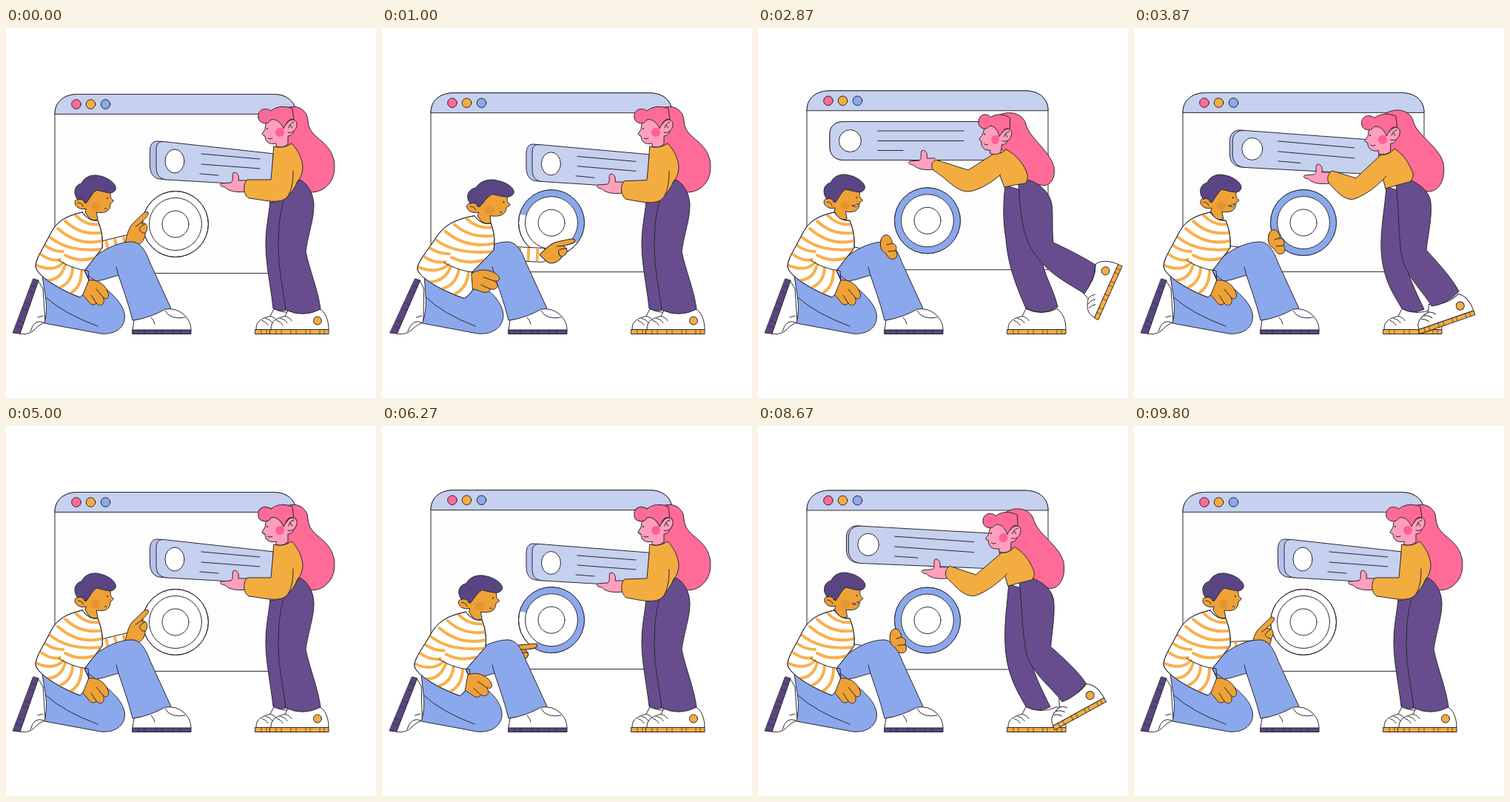
Write an HTML page that moves like this. It is 500x500 px and loops after 9.87 s.

```html
<!DOCTYPE html>
<html lang="en">
<head>
<meta charset="utf-8">
<title>Building a web page</title>
<style>
html, body { margin: 0; width: 100%; height: 100%; overflow: hidden; background: #fff; }
svg { display: block; width: 100vw; height: 100vh; }
svg * { vector-effect: non-scaling-stroke; }
.art { fill: none; stroke: #2b282e; stroke-width: 1; stroke-linejoin: round; stroke-linecap: round; }
.white { fill: #fff; } .paper { fill: #fdfdfd; }
.sky { fill: #c6d0ef; } .edge { fill: #b4c1ea; } .blue { fill: #8ba8ec; }
.plum { fill: #674d8d; } .ink { fill: #594583; }
.gold { fill: #f5ad40; } .shirt { fill: #f3ac40; } .tan { fill: #eea137; }
.rose { fill: #ff6b97; } .pink { fill: #ff9fbd; }
.stripe { stroke: #f8b04c; stroke-width: 4; }
.dark { fill: #262329; stroke: none; }
</style>
</head>
<body>
<svg viewBox="0 0 500 500">
<defs>
  <path id="knitShape" d="M103 249C80 254 68 262 60 278C50 298 40 312 40 322C41 335 75 355 100 364Q110 356 112 341L106 328L130 297C131 282 128 270 124 260Q112 262 103 249Z"/>
  <clipPath id="knit"><use href="#knitShape"/></clipPath>
  <g id="shoe">
    <path class="white" d="M1 -6C0 -18 11 -22 20 -24L25 -34Q46 -24 67 -34C75 -29 79 -19 79 -6Z"/>
    <path d="M20 -24Q26 -23 29 -18M14 -21Q20 -20 23 -15M9 -18Q14 -17 17 -12"/>
    <path class="gold" d="M0 -6H79V0H0Z"/>
    <path d="M8 -6V0M15 -6V0M28 -6V0M35 -6V0M48 -6V0M54 -6V0M67 -6V0M73 -6V0" stroke-width=".7"/>
  </g>
</defs>
<g class="art">
  <g id="page">
    <path class="paper" d="M66 331V116C66 100 78 89.500 97 89.500H361C380 89.500 392 100 392 116V331Z"/>
    <path class="sky" d="M66 116C66 100 78 89.500 97 89.500H361C380 89.500 392 100 392 116Z"/>
    <circle class="rose" cx="95" cy="103" r="6.300"/>
    <circle class="gold" cx="114.500" cy="103" r="6.300"/>
    <circle class="blue" cx="134.500" cy="103" r="6.300"/>
    <circle class="white" cx="229" cy="265" r="44.500"/>
    <circle id="dial" cx="229" cy="265" r="40" pathLength="360" transform="rotate(196 229 265)" stroke="#8ba8ec" stroke-width="9" stroke-linecap="butt"/>
    <circle cx="229" cy="265" r="44.500"/>
    <circle class="white" cx="229" cy="265" r="35.500"/>
    <circle cx="229" cy="265" r="18"/>
  </g>

  <g id="card">
    <path id="cardEdge" class="edge"/>
    <path id="cardFace" class="sky"/>
    <circle id="cardDot" class="white" r="1"/>
    <path id="cardText"/>
  </g>

  <g id="woman">
    <path id="hair" class="rose"/>
    <use href="#shoe" transform="translate(337 413.500)"/>
    <path id="farLeg" class="plum"/>
    <g id="nearShoe">
      <use href="#shoe"/>
      <circle class="gold" cx="64" cy="-18" r="5.500"/>
    </g>
    <path id="nearLeg" class="plum"/>
    <path id="torso" class="shirt"/>
    <path id="palm" class="pink" d="M325 206L314 206C316 199 311 193 307 196C305 200 308 206 304 209L291 210C287 212 292 215 296 215C300 220 310 223 325 221"/>
    <path id="arm" class="shirt"/>
    <g id="face">
      <path class="pink" d="M352 122L350 137L346 143Q347 146 350 146C350 155 358 158 365 156L365 160Q374 163 381 157L381 146C391 146 392 129 384 126L370 115Z"/>
      <circle cx="370" cy="141" r="6" fill="#ff5f90" stroke="none"/>
      <path class="rose" d="M341 121C339 111 350 106 358 112C366 105 378 105 387 109L389 124C380 121 378 132 375 136C372 127 364 122 358 124C354 132 341 129 341 121Z"/>
      <path class="pink" d="M379 130C383 122 393 122 393 130C393 138 387 143 381 141"/>
      <path d="M382 135Q383 129 389 127M384 131L387 135M354 149Q357 151 360 149"/>
      <circle class="dark" cx="353" cy="136" r="1"/>
    </g>
  </g>

  <g id="man">
    <path id="sleeveLine" stroke-width="20"/>
    <path id="sleeve" stroke="#fff" stroke-width="18"/>
    <path id="sleeveBands" stroke="#f8b04c" stroke-width="18" stroke-dasharray="4 8" stroke-linecap="butt"/>
    <g id="point">
      <path class="tan" d="M0 0C-3 -4 -8 3 -16 10L-22 16C-28 24 -29 33 -31 41L-17 44C-10 44 -4 36 -4 28C0 22 -1 17 -4 15L-10 14C-5 9 2 3 0 0Z"/>
      <path d="M-10 14L-17 19M-4 15Q-9 17 -12 22M-4 28Q-10 28 -12 23"/>
    </g>
    <path class="blue" d="M105 330C115 305 150 288 172 289C184 291 190 305 195 318L223 379Q198 393 171 395C165 370 157 350 152 334L132 340L105 346Z"/>
    <path d="M152 334L149 323"/>
    <path class="white" d="M171 408L173 395Q196 391 215 380Q230 378 240 387C248 394 250 402 250 408Z"/>
    <path d="M215 382Q222 395 242 391M196 391Q200 395 201 400"/>
    <path class="ink" d="M171 408H250V413.500H171Z"/>
    <path d="M179 408V413M187 408V413M203 408V413M211 408V413M226 408V413M236 408V413" stroke-width=".7"/>
    <g id="rest">
      <path class="tan" d="M166 287C167 280 174 277 178 282C180 285 182 288 181 291C187 292 188 297 186 301C190 305 187 313 183 312C179 314 175 309 173 305C167 302 164 296 166 287Z"/>
      <path d="M181 291L174 293M186 301L176 302"/>
    </g>

    <g id="sit">
      <path class="white" d="M43 341L50 352L53 398C46 400 41 405 37 409C31 414 24 414 18 413Z"/>
      <path d="M51 398Q38 392 33 410M50 389L43 391"/>
      <path class="ink" d="M37 339L44 341L19 413L9.500 412Z"/>
      <path d="M34 348L41 350M31 356L38 358M25 371L33 374M22 379L30 381M16 395L24 398M13 402L21 405" stroke-width=".7"/>
      <path class="blue" d="M49 334C52 360 58 375 52 399L128 413C150 415 163 402 160 386C156 366 132 350 112 335Z"/>
      <path d="M54 364Q78 386 124 403"/>
    </g>
    <g id="lean">
      <use href="#knitShape" class="white"/>
      <g class="stripe" clip-path="url(#knit)">
        <path d="M94 253Q108 268 128 265M80 261Q102 282 132 276M70 271Q98 296 132 287M60 283Q84 303 128 299M80 307Q98 317 118 311M53 294Q64 302 77 302M46 305Q60 316 73 313M40 320Q64 331 77 317M53 341Q74 342 80 320M69 352Q89 346 90 324M84 360Q102 352 102 328"/>
      </g>
      <use href="#knitShape"/>
      <path d="M71 314Q90 326 111 328L112 341"/>
      <g id="hand">
        <path class="tan" d="M112 341C122 339 134 346 138 358C140 366 135 368 131 364C135 373 128 378 122 372C118 376 114 374 110 368L104 361Z"/>
        <path d="M122 372L115 361M131 364L122 353"/>
      </g>
      <g id="head">
        <path class="tan" d="M110 215L142 217C140 228 141 231 145 233C145 236 142 236 141 237C141 247 135 251 122 249L124 259Q114 263 107 249L108 244C98 247 90 238 94 233C98 229 104 231 106 236Z"/>
        <circle cx="121" cy="241" r="6" fill="#e4952f" stroke="none"/>
        <path class="ink" d="M97 232C90 224 92 212 102 210C106 200 118 197 127 200C138 202 150 211 148 218C144 226 136 222 122 219C116 223 113 231 108 237C105 231 101 230 97 232Z"/>
        <path d="M97 236Q103 236 104 241"/>
        <circle class="dark" cx="137" cy="230" r="1"/>
        <path id="calm" d="M133 244Q135 242 136 245"/>
        <path id="smile" d="M131 241Q135 242 139 238Q139 245 131 241Z" fill="#fff"/>
      </g>
    </g>
  </g>
</g>
</svg>

<script>
const CYCLE = 4935, STEP = 1000 / 15;
const $ = id => document.getElementById(id);
const NUM = /-?[\d.]+/g;

// Monotone cubic through [time, values] keys, at rest on both ends
function curve(keys) {
  const slope = (i, n) => i < 0 || i > keys.length - 2 ? 0 :
    (keys[i + 1][1][n] - keys[i][1][n]) / (keys[i + 1][0] - keys[i][0]);
  const tangent = (i, n) => {
    const a = slope(i - 1, n), b = slope(i, n);
    return a * b > 0 ? 2 * a * b / (a + b) : 0;
  };
  return t => {
    let i = 0;
    while (i < keys.length - 2 && t >= keys[i + 1][0]) i++;
    const [t0, a] = keys[i], [t1, b] = keys[i + 1];
    const d = t1 - t0, u = Math.min(1, Math.max(0, (t - t0) / d)), s = u * u * (3 - 2 * u);
    return a.map((v, n) => v + (b[n] - v) * s +
      d * u * (1 - u) * ((1 - u) * tangent(i, n) - u * tangent(i + 1, n)));
  };
}
const value = (...keys) => {
  const f = curve(keys.map(([t, v]) => [t, [v]]));
  return t => f(t)[0];
};

// Woman and card: hold, push, stretch, ease back
const tracks = [];
function pose(id, attr, hold, push, stretch, back, dip = hold) {
  const shapes = [[0, hold], [1335, dip], [1930, push], [2465, stretch],
    [3300, stretch], [3870, back], [4650, hold], [CYCLE, hold]];
  const f = curve(shapes.map(([t, s]) => [t, s.match(NUM).map(Number)]));
  tracks.push(t => {
    const v = f(t);
    let i = 0;
    $(id).setAttribute(attr, hold.replace(NUM, () => v[i++].toFixed(2)));
  });
}

pose('cardEdge', 'd',
  'M213 153.5L204 153C198 153 194.5 158 194.5 166L194.5 185C194.5 196 199 203 207 204L217 205',
  'M173 163L168 163C160 163 155.5 168 155.5 177L155.5 198C155.5 207 160 213 168 213L173 213.5',
  'M115 126.5L115 126.5C104 126.5 97 133 97 143L97 161C97 171 104 178.5 115 178.5L115 178.5',
  'M149 138.5L143 138C135 138 129.5 144 129.5 153L129.5 170C129.5 181 136 187 145 188L150 188.5',
  'M213 159.5L204 159C198 159 195 164 195 172L195 190C195 200 199 207 207 208L217 209');
pose('cardFace', 'd',
  'M213 153.5L372 171L372 214L217 205C207 204 203 198 203 188L203 164C203 156 207 153 213 153.5Z',
  'M173 163L360 170.5L360 216L173 213.5C164 213 160.5 208 160.5 200L160.5 177C160.5 168 165 163 173 163Z',
  'M115 126.5L350 126.5L350 178.5L115 178.5C104 178.5 97 171 97 161L97 143C97 133 104 126.5 115 126.5Z',
  'M149 138.5L345 153L345 199L150 188.5C140 188 133.5 181 133.5 171L133.5 153C133.5 144 139 138 149 138.5Z',
  'M213 159.5L372 172L372 218L217 209C207 208 203 203 203 193L203 170C203 162 207 159 213 159.5Z');
pose('cardDot', 'transform',
  'translate(228 180) scale(13 16)', 'translate(188 188) scale(14 15.5)',
  'translate(124.5 152.5) scale(15 15)', 'translate(160 163.5) scale(14 15)',
  'translate(228.5 185) scale(13 15.5)');
pose('cardText', 'd',
  'M264 170L343 177M264 184L343 190M262 197L287 199',
  'M222 177L307 180.5M222 190L307 192M222 203L252 203',
  'M162 139L278 139M162 152.5L278 152.5M162 165.5L196 165.5',
  'M195 153L298 162M195 167L298 176M195 180L225 182.5',
  'M264 175L343 181M264 188L343 194M262 201L287 203');

pose('hair', 'd',
  'M372 112C388 100 408 108 408 126C410 150 436 150 443 178C448 205 432 222 412 222C398 222 388 216 382 205C382 185 380 165 370 152C380 140 380 120 372 112Z',
  'M353 118C368 108 388 113 390 132C394 150 424 162 430 186C433 210 418 227 399 227C388 225 378 220 372 210C374 190 368 172 354 160C362 145 364 128 353 118Z',
  'M322 120C336 110 358 114 362 130C366 148 394 165 400 188C402 203 396 212 386 213C376 211 362 208 350 202C350 188 344 174 324 160C332 145 332 128 322 120Z',
  'M338 117C352 106 375 110 378 128C384 146 412 160 418 182C422 205 412 221 398 221C384 218 370 214 362 206C364 190 358 172 340 158C348 145 348 125 338 117Z');
pose('farLeg', 'd',
  'M357 234C355 255 351 270 351 292C351 320 358 350 361 379Q372 386 384 378C381 350 375 320 374 290L385 225Z',
  'M346 234C342 265 336 290 338 316C340 340 355 360 361 379Q372 386 386 378C378 350 364 325 364 295L385 225Z',
  'M334 213C331 240 331 260 335 285C338 325 352 355 362 379Q384 390 405 377C400 355 390 340 385 320L375 225Z',
  'M341 215C339 245 333 270 334 300C336 340 352 362 362 379Q376 388 392 380C380 355 368 330 362 300L375 225Z');
pose('nearLeg', 'd',
  'M375 234C369 255 368 275 368 300C369 330 375 355 378 381Q402 392 425 380C422 355 411 330 405 302C410 270 416 260 416 238C415 222 407 210 397 205L380 225',
  'M362 236C358 260 357 280 360 305C364 335 377 358 382 380Q402 392 423 382C420 355 405 330 397 303C401 275 408 260 407 240C407 228 398 214 384 208L360 225',
  'M352 211C354 240 355 265 366 292C385 330 420 345 441 359Q454 342 456 320C440 310 415 297 399 290C397 270 399 255 397 238C394 222 380 208 360 204L345 208',
  'M354 213C358 240 357 270 361 305C366 335 388 352 402 376Q422 374 439 356C428 335 408 315 395 300C398 275 403 255 401 235C399 220 385 210 372 205L350 208');
pose('nearShoe', 'transform',
  'translate(357 413.5) rotate(0)', 'translate(357 413.5) rotate(0)',
  'translate(460 394) rotate(-66)', 'translate(386 413.5) rotate(-19)');
pose('torso', 'd',
  'M362 160Q374 164 386 156C396 166 400 178 401 187C401 198 397 203 394 207Q383 235 357 236L360 190Z',
  'M346 168Q358 173 368 163C380 172 385 186 388 200C389 208 386 211 382 213Q362 222 346 238L346 205Z',
  'M316 169Q328 172 335 164C350 172 360 185 364 198C365 205 363 208 361 210Q345 212 333 215L325 195Z',
  'M331 171Q343 174 352 163C366 172 372 184 377 196C378 204 374 207 372 208Q356 212 340 217L333 190Z');
pose('arm', 'd',
  'M361 172L358 205L326 205C320 211 320 225 328 230C348 232 372 240 381 227C387 217 388 205 388 193',
  'M347 172L324 208L291 206C286 212 286 226 293 233C315 236 340 244 349 238C357 225 366 205 371 192',
  'M320 169L284 192L240 178C234 181 233 189 238 193C255 203 268 222 285 221C300 219 318 207 328 198',
  'M333 172L300 203L268 193C262 197 260 205 264 210C275 222 285 234 298 231C315 225 333 210 341 200',
  'M361 172L358 206L328 207C322 212 322 226 330 232C348 235 372 242 381 229C387 218 388 206 388 194');
pose('palm', 'transform', 'translate(0 0)', 'translate(-34 5)',
  'translate(-86 -30)', 'translate(-60 -11)', 'translate(1 3)');
pose('face', 'transform',
  'translate(346 143) rotate(0) scale(1 1) translate(-346 -143)',
  'translate(328 150.5) rotate(0) scale(1 1) translate(-346 -143)',
  'translate(299 149.5) rotate(9) scale(.9 1) translate(-346 -143)',
  'translate(312 152) rotate(2) scale(1 1) translate(-346 -143)');

// Man: traces the dial, rests on the knee, returns
const trace = value([0, 0], [100, 0], [1335, .8], [1800, 1], [CYCLE, 1]);
const relax = value([0, 0], [1930, 0], [2400, 1], [3300, 1], [3870, .75], [4800, 0], [CYCLE, 0]);
const twist = value([0, 0], [100, 0], [1335, 38], [1850, 0], [CYCLE, 0]);
const slide = value([0, 0], [3300, 0], [3870, 1], [4400, 1.3], [CYCLE, 1.3]);
const fade = value([0, 1], [4250, 1], [4700, 0], [CYCLE, 0]);
const nod = value([0, 0], [1335, 0], [1930, 1], [3870, .8], [4650, 0], [CYCLE, 0]);
const mix = (a, b, u) => a + (b - a) * u;
const show = (id, on) => $(id).setAttribute('visibility', on ? 'visible' : 'hidden');
const move = (id, transform) => $(id).setAttribute('transform', transform);

function drawMan(t, bob) {
  const p = trace(t), r = relax(t), a = (203 + 345 * p) * Math.PI / 180;
  const x = mix(229 + 40 * Math.cos(a), 187, r);
  const y = mix(265 + bob + 40 * Math.sin(a), 283, r);
  const turn = twist(t), w = turn * Math.PI / 180;
  const resting = t > 2130 && t < 4200;

  $('dial').setAttribute('stroke-dasharray', `${360 * p} 400`);
  $('dial').setAttribute('opacity', p > 0 ? fade(t) : 0);

  move('point', `translate(${x} ${y}) rotate(${turn})`);
  const wx = x - 29 * Math.cos(w) - 40 * Math.sin(w);
  const wy = y - 29 * Math.sin(w) + 40 * Math.cos(w) - 12 * r;
  for (const id of ['sleeveLine', 'sleeve', 'sleeveBands'])
    $(id).setAttribute('d', `M112 302L${wx} ${wy}`);
  show('point', !resting);
  show('rest', resting);
  const s = slide(t);
  move('rest', `translate(${16 * s} ${-7 * s})`);

  // Reaching right shears the seat and also widens the upper body
  const k = .09 * Math.tanh(Math.max(0, x - 192) / 36) * (1 - r);
  const wide = 1.4 * k;
  move('sit', `matrix(1 0 ${-k} 1 ${430 * k} 0)`);
  move('lean', `matrix(${1 + wide} 0 ${-k} ${1 - k / 3} ${413 * k - 40 * wide} ${138 * k})`);
  move('hand', `translate(0 ${-130 * k}) rotate(${-350 * k} 108 352)`);
  const n = nod(t);
  move('head', `translate(${-4 * n} ${-n})`);
  const happy = t > 1500 && t < 4300;
  show('smile', happy);
  show('calm', !happy);
}

function frame() {
  let t = performance.now() % CYCLE;
  t -= t % STEP;
  const bob = 2.5 * (Math.cos(2 * Math.PI * t / CYCLE) - 1);
  move('page', `translate(0 ${bob})`);
  tracks.forEach(draw => draw(t));
  drawMan(t, bob);
  requestAnimationFrame(frame);
}
frame();
</script>
</body>
</html>
```
